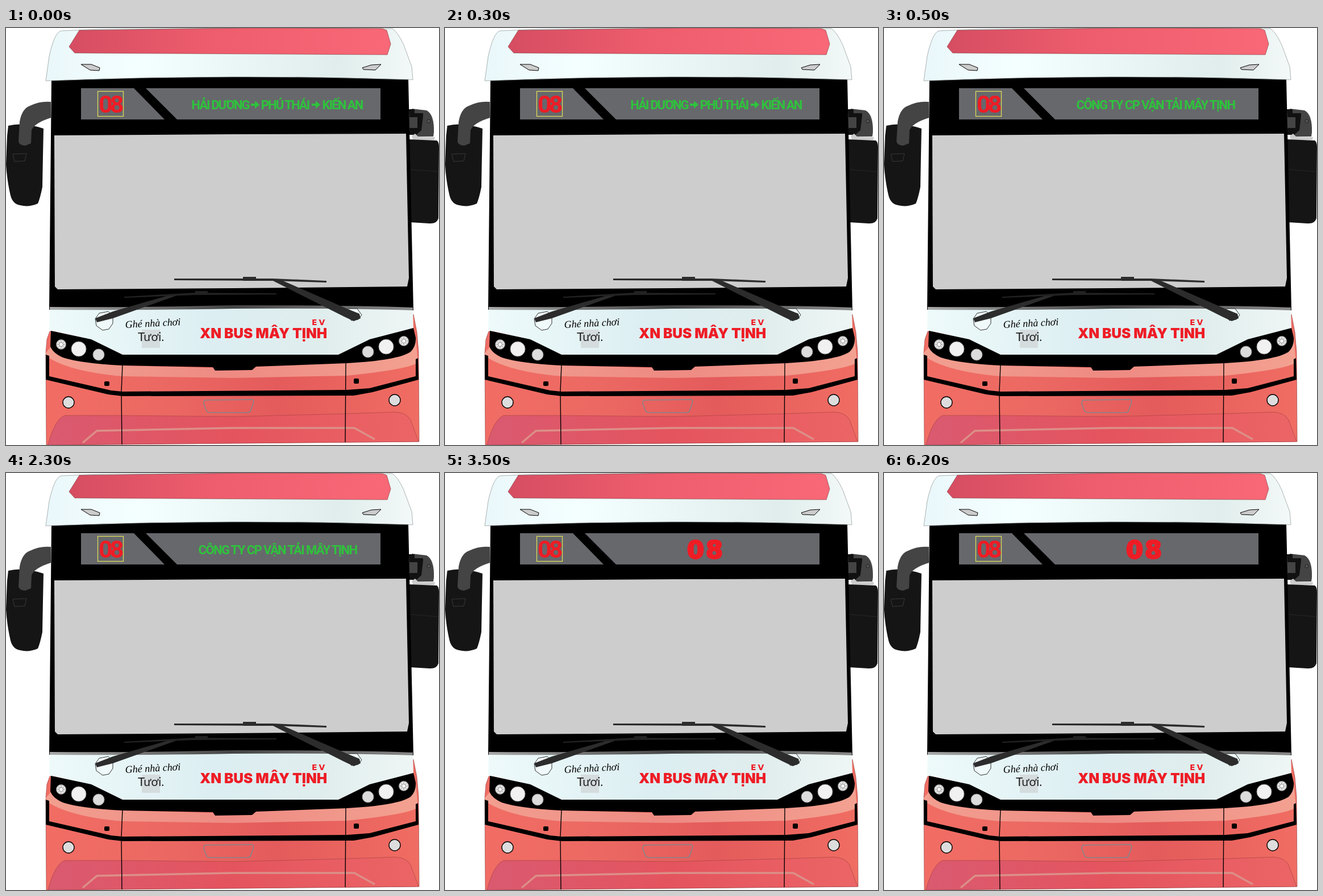
These frames come from a looping animation (762x734 px, 8 s). An HTML page:

```html
<!DOCTYPE html>
<html lang="vi">
<head>
<meta charset="utf-8">
<title>Bus front with changing route sign</title>
<style>
  html, body { margin: 0; height: 100%; overflow: hidden; background: #fff; }
  svg { display: block; width: 100vw; height: 100vh; }
  .line { fill: none; stroke: #000; }
  .sign { font: bold 22px Roboto, sans-serif; fill: #2ec33c; text-anchor: middle; }
  .red { fill: #ee1c25; }
</style>
</head>
<body>
<svg viewBox="0 0 762 734">
  <defs>
    <linearGradient id="roof">
      <stop stop-color="#eaf7fa"/><stop offset=".25" stop-color="#f4ffff"/>
      <stop offset=".8" stop-color="#e0edec"/><stop offset="1" stop-color="#f3f9f8"/>
    </linearGradient>
    <linearGradient id="roofRed"><stop stop-color="#d64d62"/><stop offset=".45" stop-color="#ee5d6d"/><stop offset="1" stop-color="#f96877"/></linearGradient>
    <linearGradient id="panel">
      <stop stop-color="#eefafa"/><stop offset=".45" stop-color="#dceef2"/>
      <stop offset=".75" stop-color="#e0eded"/><stop offset="1" stop-color="#eef6f5"/>
    </linearGradient>
    <linearGradient id="bumper"><stop stop-color="#f16d64"/><stop offset=".3" stop-color="#ec6963"/><stop offset=".62" stop-color="#e45b5b"/><stop offset="1" stop-color="#f06d63"/></linearGradient>
    <linearGradient id="band"><stop stop-color="#f29f90"/><stop offset=".5" stop-color="#ee8a82"/><stop offset="1" stop-color="#f3a191"/></linearGradient>
    <linearGradient id="skirt"><stop stop-color="#da5a70"/><stop offset=".5" stop-color="#e4545e"/><stop offset="1" stop-color="#ec6566"/></linearGradient>
    <linearGradient id="edge"><stop stop-color="#aaa"/><stop offset=".5" stop-color="#444"/><stop offset="1" stop-color="#888"/></linearGradient>
    <g id="facetLamp" stroke="#888">
      <circle r="8.5" fill="#e5e5e5"/>
      <path d="M-8 0H8M0-8V8M-5.5-5.5L5.5 5.5M-5.5 5.5L5.5-5.5" stroke="#aaa"/>
      <circle r="3.5" fill="#fff"/>
    </g>
    <path id="arrow" d="M0-2H7V-7L15 0L7 7V2H0Z" fill="#2ec33c"/>
  </defs>

  <!-- Mirrors -->
  <path d="M4 172Q30 165 66 177L65 225L64 280Q60 300 56 309Q40 316 25 312Q12 310 8 295Q2 270 0 240L2 190Z" fill="#151515"/>
  <path d="M79 130Q60 128 42 137Q28 142 24 165L22 200Q24 207 34 207L44 203L45 180Q50 167 79 158Z" fill="#444"/>
  <path class="line" d="M12 222L36 221L33 234L15 235Z" style="stroke:#383838"/>
  <path d="M714 142L740 145Q754 152 753 184L752 191L716 191Z" fill="#444"/>
  <path d="M709 143H719V150H734V155L731 180L722 188H710Z" fill="#111"/>
  <path d="M709 157H724V176H709Z" fill="#444"/>
  <circle cx="744" cy="164" r="3" fill="#555" stroke="#222"/>
  <path d="M714 190L720 186L725 191L755 192L754 197L716 197Z" fill="#ccc"/>
  <path d="M709 196L758 198Q762 200 762 210L761 335Q758 345 745 344L712 342Z" fill="#151515"/>
  <path class="line" d="M712 249L761 253" style="stroke:#272727"/>

  <!-- Cab -->
  <path d="M80 92Q400 80 708 90L717 497L76 496Z"/>
  <path d="M70 93L76 50Q85 8 97 5L165 2L430 0L680 1Q690 8 700 30L714 68L716 91Q400 80 70 93Z" fill="url(#roof)" stroke="#8b9292" stroke-width=".7"/>
  <path d="M129 4L430 0L662 1L670 4L677 28L671 47L121 44L111 33Z" fill="url(#roofRed)" stroke="#733" stroke-width=".6"/>
  <path d="M132 64H150L165 70L164 75L148 74ZM660 64L643 65L627 70L629 73L650 74Z" fill="#ccc" stroke="#000"/>
  <path d="M85 189L400 187L704 186L709 440L706 455L400 458L91 460L86 455Z" fill="#cdcdcd"/>
  <path d="M132 106H659V161H132Z" fill="#67686c"/>
  <path d="M225 106H246L301 161H279Z"/>

  <!-- Bumper -->
  <path d="M77 534L72 548L70 572L71 734L727 728L726 570L723 535L717 504L700 550Z" fill="url(#bumper)" stroke="#944" stroke-width=".7"/>
  <path d="M70 572L80 560Q110 590 205 594L364 598L600 589Q700 582 721 545L725 588Q715 600 600 612L400 616L205 613Q110 605 70 577Z" fill="url(#band)"/>
  <path d="M70 575L76 577V613L185 638L205 640L600 637L640 634L721 613V583L725 581L726 619L645 641L612 647L205 648L180 645L70 619Z"/>
  <path d="M74 734Q85 690 103 682L205 682L400 684L597 679L685 676Q705 677 712 690L726 728Z" fill="url(#skirt)" stroke="#a44" stroke-width=".7"/>
  <path class="line" d="M135 730L160 709L400 704H613L649 724" style="stroke:#dc8f88;stroke-width:3.5"/>
  <path class="line" d="M205 593L203 640L204 733M598 589L597 729" stroke-width="1.4"/>
  <path class="line" d="M351 655L433 654Q437 655 435 661L431 672Q430 677 425 677H360Q354 677 352 672L348 661Q348 656 351 655Z" style="stroke:#85858a;stroke-width:1.6"/>
  <g fill="#ddd" stroke="#000" stroke-width="1.4"><circle cx="110" cy="659" r="10"/><circle cx="684" cy="655" r="10"/></g>
  <rect x="173" y="622" width="9" height="8" rx="2"/>
  <rect x="612" y="617" width="9" height="9" rx="2"/>

  <!-- Front panel and headlights -->
  <path d="M77 492Q250 493 400 490Q600 489 716 494L717 530L640 549L585 575H205L150 549L76 532Z" fill="url(#panel)"/>
  <path d="M77 491Q250 492 400 488Q600 488 716 492V497Q600 493 400 494Q250 497 77 496Z" fill="url(#edge)"/>
  <path d="M79 533L150 548L205 575H585L640 548L717 528L721 545Q722 560 712 570Q690 585 600 590L440 596L433 602L368 603L364 597L205 594Q130 590 100 580Q82 572 78 560Z"/>
  <use href="#facetLamp" x="97" y="557"/>
  <use href="#facetLamp" x="700" y="551"/>
  <g fill="#f1f1f1" stroke="#999"><circle cx="128" cy="565" r="13"/><circle cx="669" cy="561" r="13"/></g>
  <g fill="#dcdcdc" stroke="#999"><circle cx="163" cy="575" r="10"/><circle cx="637" cy="570" r="10"/></g>

  <!-- Wipers -->
  <path d="M164 502L180 499L188 506V520L181 530L170 532L159 524L157 512ZM602 494H618L626 505L620 513L608 515L598 504Z" fill="#f1fafa" stroke="#000" stroke-width=".8"/>
  <g fill="#2c2c2c">
    <path d="M157 511L188 499L285 471H300L188 511L160 518Z"/>
    <path d="M208 473L330 466L476 467V469L330 470L208 475ZM333 463H355V468H333Z" fill="#222"/>
    <path d="M296 441H470L564 445V448L470 445L296 444ZM417 438H440V445H417Z"/>
    <path d="M470 445L485 444L600 494L622 503L624 511L612 516L595 508Z"/>
  </g>

  <!-- Lettering -->
  <rect x="239" y="531" width="32" height="32" fill="#d5dcde"/>
  <text transform="translate(210 528) rotate(-3)" font-family="Liberation Serif, serif" font-style="italic" font-size="18">Ghé nhà chơi</text>
  <text x="232" y="551" font-family="Lato, sans-serif" font-size="21" fill="#222">Tươi.</text>
  <text class="red" x="341" y="546" font-family="Inter, sans-serif" font-weight="900" font-size="24.5">XN BUS MÂY TỊNH</text>
  <text class="red" x="538" y="523" font-family="DejaVu Sans, sans-serif" font-weight="bold" font-size="14" letter-spacing="3">EV</text>

  <!-- Route sign -->
  <rect x="161.5" y="111.5" width="45" height="44" fill="none" stroke="#dcdc58" stroke-width="1.3"/>
  <text class="red" x="163" y="149" font-family="Roboto, sans-serif" font-weight="bold" font-size="43" letter-spacing="-5">08</text>
  <g class="message sign" letter-spacing="-1.9">
    <text x="377" y="143">HẢI DƯƠNG</text>
    <use href="#arrow" x="431" y="135"/>
    <text x="491" y="143">PHÚ THÁI</text>
    <use href="#arrow" x="538" y="135"/>
    <text x="592" y="143">KIẾN AN</text>
  </g>
  <g class="message sign" letter-spacing="-1.6">
    <text x="478" y="143">CÔNG TY CP VẬN TẢI MÂY TỊNH</text>
  </g>
  <g class="message">
    <text class="red" x="426" y="150" font-family="DejaVu Sans, sans-serif" font-weight="bold" font-size="43" letter-spacing="3" stroke="#ee1c25" stroke-width="3">08</text>
  </g>
</svg>
<script>
  const LOOP = 8000;
  const messageEnds = [500, 3500, LOOP];
  const messages = document.querySelectorAll('.message');
  const start = performance.now();

  function draw() {
    const time = (performance.now() - start) % LOOP;
    const current = messageEnds.findIndex(end => time < end);
    messages.forEach((message, i) => {
      message.style.display = i === current ? '' : 'none';
    });
    requestAnimationFrame(draw);
  }
  draw();
</script>
</body>
</html>
```
